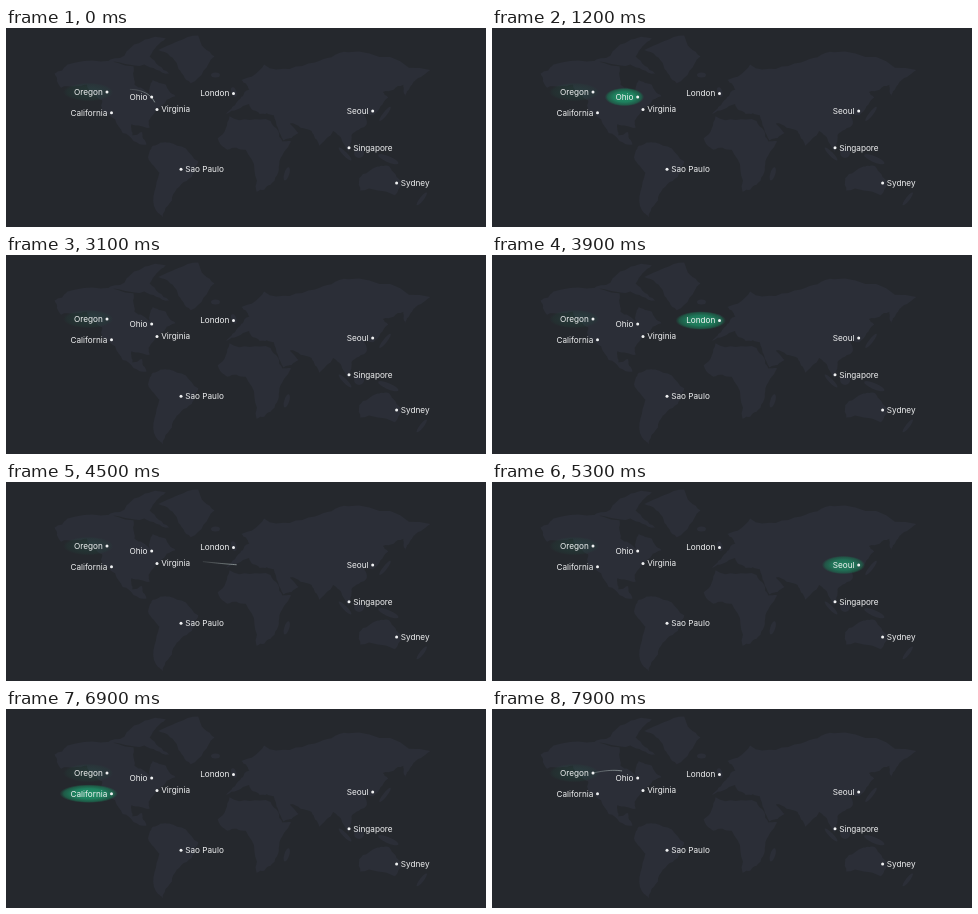
Write an HTML page with a canvas that moves like this. It is 480 px wide and 199 px high and loops after 8000 ms.

```html
<!DOCTYPE html>
<html lang="en">
<head>
<meta charset="utf-8">
<title>Region map</title>
<style>
  html, body { margin: 0; width: 100%; height: 100%; overflow: hidden; background: #25282d; }
  canvas { display: block; width: 480px; height: 199px; }
</style>
</head>
<body>
<canvas id="stage"></canvas>
<script>
const W = 480, H = 199, LOOP = 8000;
const SPEED = 0.28, TAIL = 34; // px per ms, px
const canvas = document.getElementById('stage');
const ctx = canvas.getContext('2d');
const ratio = window.devicePixelRatio || 1;
canvas.width = W * ratio;
canvas.height = H * ratio;

const clamp = v => Math.max(0, Math.min(1, v));
const map = new Path2D();
let seed = 7;

function random() {
  seed = seed * 16807 % 2147483647;
  return seed / 2147483647;
}

function project(lon, lat) {
  const phi = lat * Math.PI / 180;
  return [230 + 1.08 * lon, 126 - 74 * Math.log(Math.tan(Math.PI / 4 + 0.4 * phi))];
}

// Splits a coast line in halves, nudging each middle point sideways
function coast(a, b, depth) {
  if (depth) {
    const k = (random() - 0.5) * 0.24;
    const mid = [(a[0] + b[0]) / 2 + (b[1] - a[1]) * k, (a[1] + b[1]) / 2 - (b[0] - a[0]) * k];
    coast(a, mid, depth - 1);
    coast(mid, b, depth - 1);
  } else {
    map.lineTo(b[0], b[1]);
  }
}

function addLand(lonLat) {
  const pts = [];
  for (let i = 0; i < lonLat.length; i += 2) pts.push(project(lonLat[i], lonLat[i + 1]));
  map.moveTo(pts[0][0], pts[0][1]);
  pts.forEach((p, i) => coast(p, pts[(i + 1) % pts.length], 3));
  map.closePath();
}

function addIsland(lon, lat, rx, ry, tilt) {
  const [x, y] = project(lon, lat), part = new Path2D();
  part.ellipse(x, y, rx, ry, tilt, 0, Math.PI * 2);
  map.addPath(part);
}

// North America, its arctic islands, Greenland
addLand([-168,66, -156,71, -95,70, -94,59, -80,52, -77,62, -65,59, -56,51, -70,43, -81,31,
  -80,25, -97,28, -96,18, -87,21, -83,9, -105,20, -124,40, -124,48, -138,59, -162,57]);
addLand([-120,72, -90,81, -65,83, -80,75, -62,66, -85,71]);
addLand([-72,78, -35,84, -20,75, -42,60, -54,70]);
// South America, Africa
addLand([-77,8, -62,11, -35,-7, -41,-22, -58,-37, -68,-55, -74,-50, -71,-18, -81,-5]);
addLand([-6,35, 32,31, 43,12, 51,12, 40,-10, 32,-29, 19,-35, 9,4, -8,4, -17,15]);
// Eurasia, Australia
addLand([-9,37, -1,44, 8,54, 24,59, 12,56, 5,62, 26,71, 73,72, 104,77, 180,68, 163,59, 157,51,
  155,59, 136,54, 141,50, 127,36, 118,39, 121,28, 107,18, 104,2, 97,16, 90,22, 77,8, 70,22,
  50,29, 58,20, 44,13, 35,36, 22,37, 12,45]);
addLand([114,-23, 131,-12, 142,-12, 153,-27, 147,-38, 115,-34]);
addIsland(-2, 54, 2.5, 5, -0.3);
addIsland(-19, 65, 4.5, 2.5, 0);
addIsland(138, 37, 9, 2, -0.9);
addIsland(47, -19, 2.5, 7, 0.3);
addIsland(101, 0, 9, 2, 0.8);
addIsland(114, 1, 5, 5, 0);
addIsland(141, -5, 11, 3, 0.4);
addIsland(172, -41, 8, 2, -0.9);

// side: which side of the dot the label sits on; w: label width
const city = (name, x, y, side, w) => ({ name, x, y, side, w });
const cities = {
  oregon: city('Oregon', 101, 64, -1, 29),
  california: city('California', 105.5, 84.7, -1, 37),
  ohio: city('Ohio', 145.7, 69, -1, 18),
  virginia: city('Virginia', 151, 81.5, 1, 30),
  london: city('London', 227.5, 65.5, -1, 29),
  seoul: city('Seoul', 366.7, 83, -1, 22),
  singapore: city('Singapore', 343, 119.7, 1, 40),
  saoPaulo: city('Sao Paulo', 175, 141.3, 1, 39),
  sydney: city('Sydney', 390.6, 155, 1, 28)
};

// Bend point of each route and the time its signal arrives
const route = (to, bx, by, arrive) => ({ to: cities[to], bx, by, arrive });
const routes = [
  route('virginia', 146, 54, 32),
  route('ohio', 125, 58, 1060),
  route('saoPaulo', 130, 112, 2307),
  route('london', 164, 50, 3620),
  route('seoul', 234, 92.5, 4990),
  route('california', 108, 75, 6750)
];

function pointOn(r, t) {
  const a = cities.oregon, u = 1 - t;
  return [
    u * u * a.x + 2 * u * t * r.bx + t * t * r.to.x,
    u * u * a.y + 2 * u * t * r.by + t * t * r.to.y
  ];
}

function measure(r) {
  let sum = 0, last = pointOn(r, 0);
  for (let i = 1; i <= 40; i++) {
    const p = pointOn(r, i / 40);
    sum += Math.hypot(p[0] - last[0], p[1] - last[1]);
    last = p;
  }
  return sum;
}
routes.forEach(r => { r.length = measure(r); });

function drawGlow(c, alpha) {
  if (alpha <= 0) return;
  const near = c.x - c.side * 2, far = c.x + c.side * (4.5 + c.w);
  ctx.save();
  ctx.globalAlpha = alpha;
  ctx.translate((near + far) / 2 - 3, c.y);
  ctx.scale(Math.abs(far - near) / 2 + 7.5, 9.3);
  const g = ctx.createRadialGradient(0, 0, 0, 0, 0, 1);
  g.addColorStop(0, '#20946a');
  g.addColorStop(0.55, '#1e8460f2');
  g.addColorStop(0.85, '#1c7052b3');
  g.addColorStop(1, '#1c644b00');
  ctx.fillStyle = g;
  ctx.beginPath();
  ctx.arc(0, 0, 1, 0, Math.PI * 2);
  ctx.fill();
  ctx.restore();
}

function drawSignal(r, since) {
  const head = r.length + since * SPEED;
  const from = Math.max(0, head - TAIL), to = Math.min(r.length, head);
  if (to <= from) return;
  const steps = 16;
  ctx.lineWidth = 0.7;
  for (let i = 0; i < steps; i++) {
    const s = from + (to - from) * i / steps;
    const e = from + (to - from) * (i + 1) / steps;
    ctx.strokeStyle = `rgba(215,230,225,${0.15 + 0.6 * clamp((e - head + TAIL) / TAIL)})`;
    ctx.beginPath();
    ctx.moveTo(...pointOn(r, s / r.length));
    ctx.lineTo(...pointOn(r, e / r.length));
    ctx.stroke();
  }
}

function drawCity(c) {
  ctx.fillStyle = '#f0f1f2';
  ctx.beginPath();
  ctx.arc(c.x, c.y, 1.5, 0, Math.PI * 2);
  ctx.fill();
  ctx.textAlign = c.side < 0 ? 'right' : 'left';
  ctx.fillText(c.name, c.x + c.side * 4.2, c.y + 2.9);
}

function draw(time) {
  ctx.setTransform(ratio, 0, 0, ratio, 0, 0);
  ctx.fillStyle = '#25282d';
  ctx.fillRect(0, 0, W, H);
  ctx.fillStyle = '#2b2e37';
  ctx.fill(map);

  drawGlow(cities.oregon, 0.13);
  for (const r of routes) {
    // Signed time from arrival, wrapped around the loop
    const since = (time - r.arrive + 1.5 * LOOP) % LOOP - LOOP / 2;
    drawGlow(r.to, Math.min(clamp(since / 80), clamp((600 - since) / 350)));
    drawSignal(r, since);
  }

  ctx.font = '8.2px Inter, "Liberation Sans", sans-serif';
  ctx.textBaseline = 'alphabetic';
  Object.values(cities).forEach(drawCity);
}

const start = performance.now();
function tick() {
  draw((performance.now() - start) % LOOP);
  requestAnimationFrame(tick);
}
tick();
</script>
</body>
</html>
```
